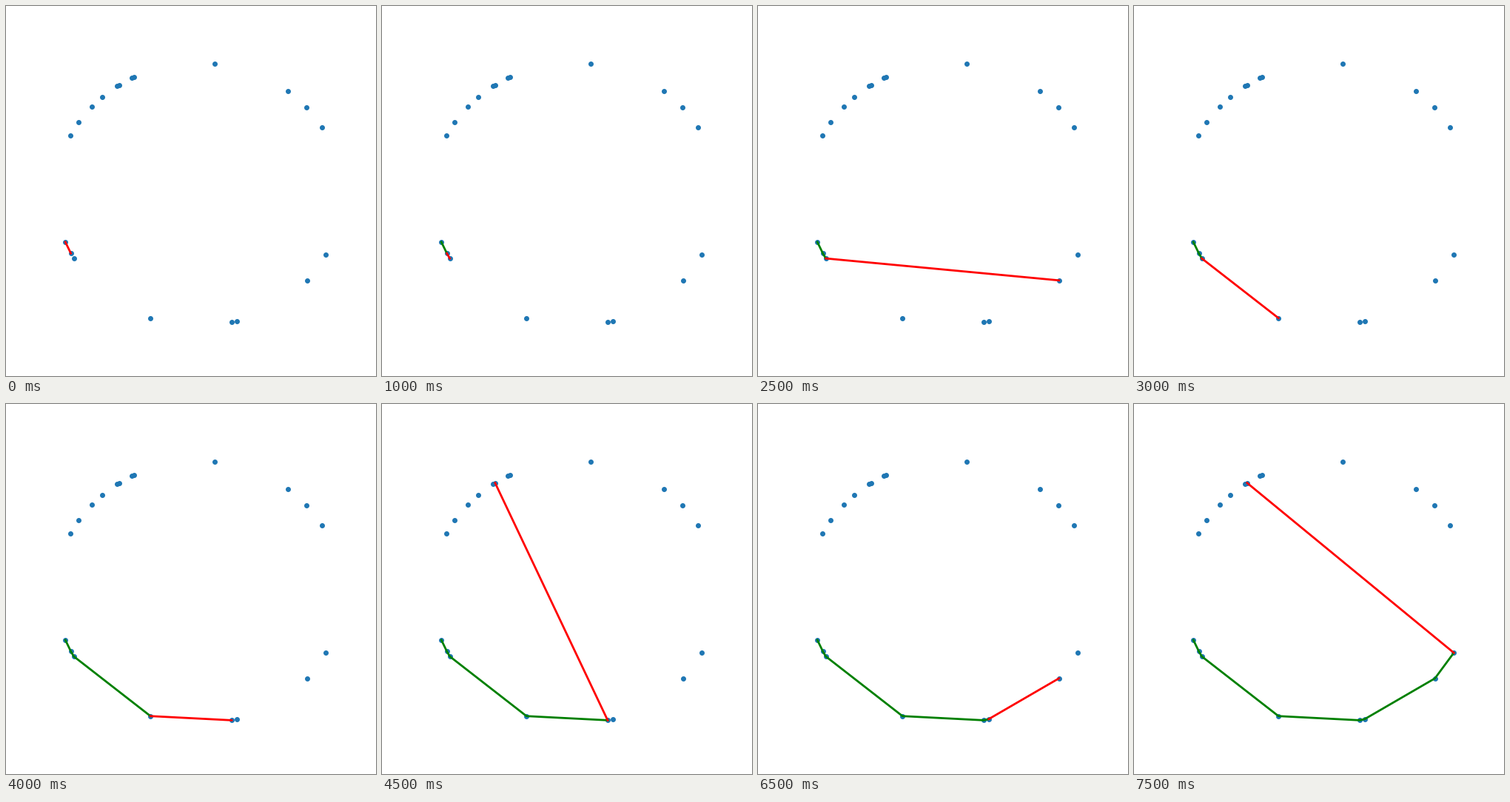
Animation of 500x500 px, one loop 8000 ms. Source, as a matplotlib script:

```python
from itertools import islice

import matplotlib.pyplot as plt
import numpy as np
from matplotlib.animation import FuncAnimation

SIZE = 500
STEPS = 16
CENTER = np.array([260.46, 254.38])
RADII = np.array([193.44, 177.77])

# Points scattered on an ellipse, as degrees clockwise from the right.
ANGLES = np.radians([
    236.2, -51.5, 40.9, -41.3, 109.7, 27.4, 153.3, 76.7, 158.7, 150.8,
    221.7, 74.6, -30.6, -83.6, 243.1, 242.2, 235.3, 227.6, 213.1, 206.5,
])
POINTS = CENTER + RADII * np.column_stack([np.cos(ANGLES), np.sin(ANGLES)])


def is_outside(p, q, r):
    """True if r lies on the outer side of the line from p to q."""
    (ax, ay), (bx, by) = POINTS[q] - POINTS[p], POINTS[r] - POINTS[p]
    return ax * by - ay * bx > 0


def gift_wrap():
    """Yield the hull so far and each improved candidate for its next point."""
    p = int(POINTS[:, 0].argmin())
    path = [p]
    while True:
        best = (p + 1) % len(POINTS)
        for r in range(len(POINTS)):
            if is_outside(p, best, r):
                best = r
                yield list(path), best
        p = best
        if p == path[0]:
            return
        path.append(p)


steps = list(islice(gift_wrap(), STEPS))

fig = plt.figure(figsize=(SIZE / 100, SIZE / 100), dpi=100, facecolor="white")
ax = fig.add_axes([0, 0, 1, 1])
ax.set_xlim(0, SIZE)
ax.set_ylim(SIZE, 0)
ax.axis("off")

ax.plot(*POINTS.T, "o", color="tab:blue", markersize=4, zorder=1)
hull, = ax.plot([], [], color="green", linewidth=2, zorder=2)
probe, = ax.plot([], [], color="red", linewidth=2, zorder=3)


def draw(i):
    path, best = steps[i]
    hull.set_data(*POINTS[path].T)
    probe.set_data(*POINTS[[path[-1], best]].T)
    return hull, probe


anim = FuncAnimation(fig, draw, frames=STEPS, interval=500,
                     repeat=True, repeat_delay=0)
plt.show()
```
